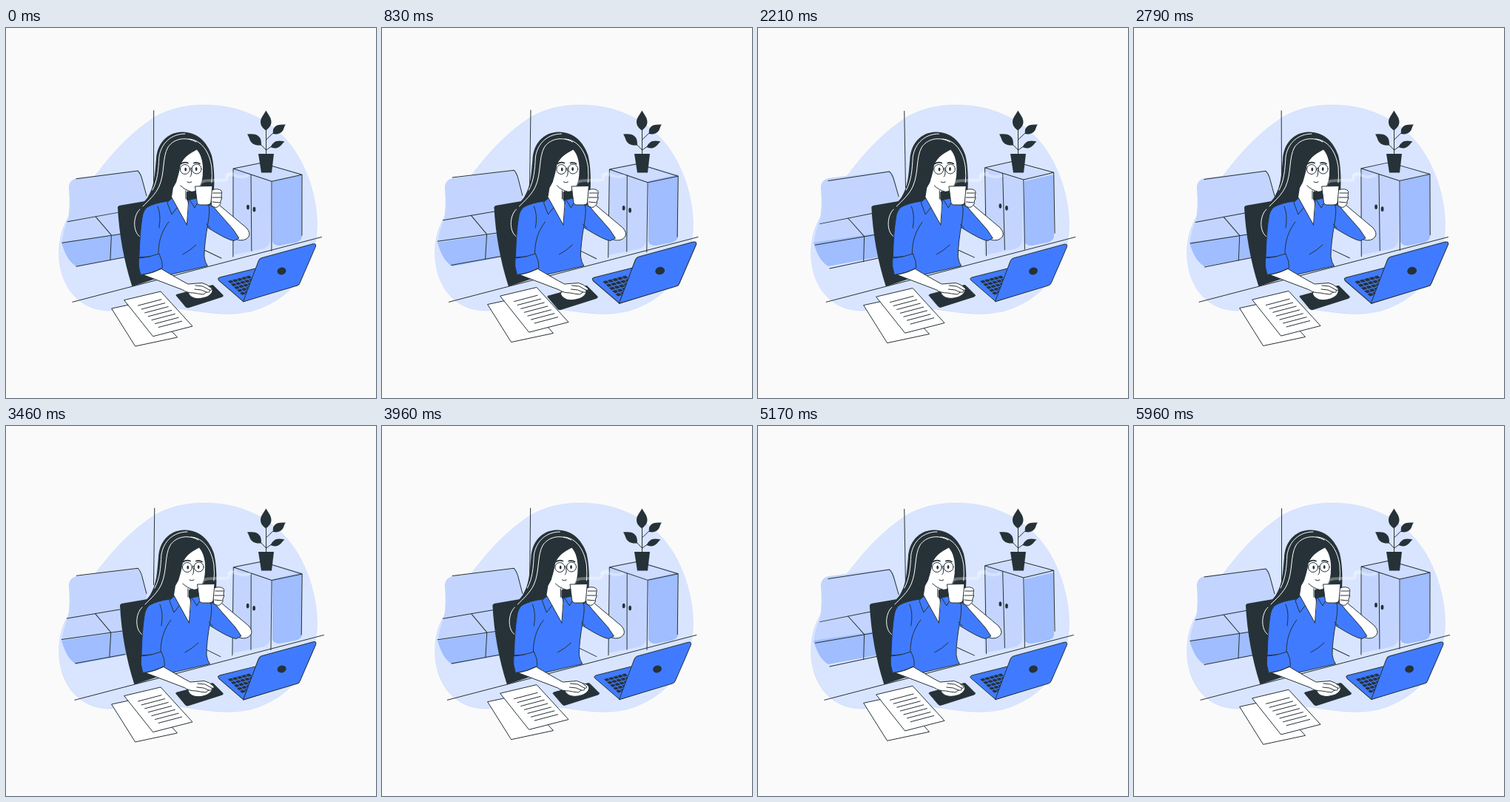
An HTML page that plays this animation: 500x500 px, repeating every 6 s.

```html
<!DOCTYPE html>
<html lang="en">
<head>
<meta charset="utf-8">
<title>Coffee at the desk</title>
<style>
html, body { margin: 0; width: 100%; height: 100%; overflow: hidden; background: #fafafa; }
svg { display: block; width: 100vw; height: 100vh; }
.line { fill: none; stroke: #263238; stroke-width: 1; stroke-linecap: round; stroke-linejoin: round; }
.dark { fill: #263238; }
.blue { fill: #407bff; }
.white { fill: #fff; }
.edge { stroke: #263238; stroke-width: 1; stroke-linecap: round; stroke-linejoin: round; }
.shine { fill: none; stroke: #fff; stroke-width: 1; stroke-linecap: round; }
</style>
</head>
<body>
<svg viewBox="0 0 500 500">
  <!-- backdrop -->
  <path fill="#d9e5ff" stroke="#407bff" stroke-opacity=".2" stroke-width=".5" d="M268 104C312 104 350 120 377 149C404 178 420 224 420.500 266C420 316 392 358 350 376C325 388 297 388 268 384C235 380 212 374 188 377C168 380 156 382 137 382C108 381 82 362 74 326C68 298 74 272 84 256C92 236 104 219 124 195C141 173 165 144 200 121C222 108 246 104 268 104Z"/>
  <path fill="#c3d5ff" d="M95 203L178 193Q183 196 185 205L190 229V275L143 280L75 291Q77 275 84 258Q87 240 85 218Q84 206 95 203Z"/>
  <path fill="#9fbdff" d="M75 290L143 280L165 277V309L95 322Q82 315 75 290Z"/>
  <path fill="#cddcff" d="M307 190L345 182L400 198L359 207Z"/>
  <path fill="#c3d5ff" d="M307 190L359 207L357 288Q356 297 345 299L306 307Z"/>
  <path fill="#9fbdff" d="M360 207L400 198V282Q399 288 391 290L370 294Q361 294 360 288Z"/>

  <g id="room">
    <g class="line">
      <path d="M199.500 111.500V215M95 204L178 193Q182 197 184 205L190 227M83 262L154 249M121 255L142.500 280L141 314M76 290.500L158 278M95 322.500L162 309.500M268 300L291 311"/>
      <path d="M307 190L345 182L400 198L359 207ZM307 190V309M331 198L332 301M359 207V301M400 198V280"/>
    </g>
    <ellipse class="dark" cx="327" cy="242" rx="1.900" ry="3.300"/>
    <ellipse class="dark" cx="335.500" cy="245" rx="1.900" ry="3.300"/>
  </g>

  <!-- plant -->
  <path class="line" d="M351.500 172V130M351.500 165L343 156M351.500 151L362 141M351.500 165L360 159"/>
  <g class="dark">
    <path d="M341 170H362L359 195.500H345Z"/>
    <path d="M351.300 111.500C355 118 358.500 121 358.500 127C358.500 133 354 136 351.300 138.500C348 136 344 133 344 127C344 121 348 118 351.300 111.500Z"/>
    <path d="M326 143.500C333 143 339 143 342 147C345 150 345 155 345 158.500C340 159 335 158 332 155C329 152 329 148 326 143.500Z"/>
    <path d="M378 130.500C370 130 365 131 363 134C360 137 361 140 361 143C366 144 370 143 373 140C376 137 375 134 378 130.500Z"/>
    <path d="M376.500 153.500C370 152 365 152 362 155C359 157 359 159 357.500 161C362 163 367 163 370 160C373 158 373 156 376.500 153.500Z"/>
  </g>

  <g id="desk"></g>

  <g id="sheets" class="white edge">
    <path d="M143 379.400L187 370L231.500 418.400L175 430.400Z"/>
    <path d="M160 368L209 356.400L252 403.400L199 417Z"/>
    <path id="text" class="line"/>
  </g>

  <g id="woman">
    <path class="line" d="M90 370.300L426.500 282.500"/>
    <path class="dark" d="M153 240L188 234L205 338L170.500 349.300Q154 298 151 242Z"/>
    <!-- hair -->
    <path class="dark" d="M238 140.500C258 140 272 154 278 172C282 188 283 215 279 239L240 240L205 243C192 243 187 258 185 283C175 280 171 268 172 257C173 244 184 240 192 228C201 213 201 198 203 178C204 157 217 141 238 140.500Z"/>
    <path class="shine" d="M183 283C171 278 171 254 181 245"/>
    <!-- raised arm -->
    <path class="white edge" d="M278 240L288 239L325 270Q331 277 328 282Q323 289 312 286L285 266Z"/>
    <path class="blue edge" d="M266 238Q280 238 285 247L307 272L315 284L308 287.500Q300 287 273 270Z"/>
    <!-- shirt -->
    <path class="blue edge" d="M191 242Q202 236 219 234L226 229L243 233L258 230L274 240Q276 246 273 264Q268 292 268 309Q269 317 272.500 321.500L212 335.500L205 308L180 310Q181 275 184 257Q185 247 191 242Z"/>
    <path class="white" d="M231 207L250 216L244 222V231L247 240L244.500 266L224 229L226 216Z"/>
    <path class="line" d="M244.500 266L224 229L218 236L224 252L231 243M244.500 266L247 230L255 243L259 236M243 219L243 231M220 262C211 274 206 287 206 306M271 265L276 270M257 293Q250 300 239 306M205 241Q210 252 207 270"/>
    <!-- face -->
    <path class="white" d="M258 164.500C264 171 267 183 266 195C266 210 260 221 250 221C241 220 235 216 230 211C231 203 234 198 235 189C237 177 247 170 258 164.500Z"/>
    <path class="line" d="M236 213Q242 219 250 221M250 191Q252 198 249 201M245 208Q248 210 251 208M235 189L232 187M248.500 190Q250 188 251.500 190"/>
    <path class="line" style="stroke-width:1.800" d="M236.500 183.500Q241 180.500 246 182.500M254 182.500Q258 181 262 183.500"/>
    <circle class="line" cx="242" cy="191" r="6.500"/>
    <circle class="line" cx="257.700" cy="190.500" r="6.500"/>
    <ellipse class="dark" cx="242.800" cy="191" rx="1.400" ry="2.600"/>
    <ellipse class="dark" cx="257.200" cy="190.500" rx="1.400" ry="2.600"/>
    <path class="shine" d="M257 154C245 147 228 148 219 161C211 175 215 196 207 214C202 225 193 233 185 241M242 143C224 143 210 155 207 174C206 192 205 206 198 219M247 150C264 151 275 167 278 188Q279 200 278 209"/>
    <!-- steam -->
    <path fill="none" stroke="#fff" stroke-opacity=".32" stroke-width="4" d="M262 214C261 207 268 206 279 206C290 205 299 208 299 202C298 197 304 197 312 200Q319 203 328 199"/>
    <path fill="none" stroke="#fff" stroke-opacity=".25" stroke-width="3" d="M297 201C298 196 302 195 309 196"/>
    <!-- cup and hand -->
    <path class="white edge" d="M276 221C280 217 286 217 290 219Q293 221 291 226Q293 230 290 234Q291 238 288 240Q284 245 278 240Z"/>
    <path class="line" d="M280 223L291 223M279 229L291 229M279 235L289 236"/>
    <path class="white edge" d="M256 214L279 213.500L277 236Q276 239 272 239H262Q259 239 258.500 236Z"/>
    <!-- mouse arm -->
    <path class="blue edge" d="M179.500 311Q194 310 207 305Q212 315 211.500 324Q197 332 182 333.500Q178 322 179.500 311Z"/>
    <path class="white edge" d="M186 333.500Q199 331 210 325.500Q231 338 246 346L265 344.500Q272 346 278 352Q279 355 275 354Q277 358 271 357L267 360Q258 359 254 358Q244 358 239 354Z"/>
    <path class="line" d="M256 348L266 349L275 354M255 353L264 354L271 357"/>
  </g>
</svg>
<script>
const $ = id => document.getElementById(id);
const shape = (cls, d) => `<path class="${cls}" d="${d}"/>`;

// keyboard on a slanted grid
let keys = "";
for (let r = 0; r < 5; r++) {
  for (let c = 0; c < 5; c++) {
    const x = 300 + c * 6 + r * 4, y = 342 - c * 1.55 + r * 3.9;
    keys += `M${x} ${y}l5-1.300l3 2.900l-5 1.300z`;
  }
}
$("desk").innerHTML =
  shape("dark edge", "M231 361Q231 360 234 359.500L277 348Q280 347 281 348.500L293.500 361Q294 362 292 363L248 377Q246 378 244 376.500Z") +
  shape("white edge", "M247 357C250 350 267 345 276 349C283 353 279 361 269 364C259 367 249 365 247 357Z") +
  shape("blue edge", "M287 338.500L289 337L337 325L395 346L321 369.500L288 341Z") +
  shape("dark", keys) +
  shape("blue edge", "M320.500 369.500L341 315Q342 312 345 311L414 292.200Q418.500 291.500 417.500 295.500L396.500 344Q395.500 347 393 347.800Z") +
  `<ellipse class="dark" cx="372" cy="328.500" rx="6" ry="4.800" transform="rotate(-15 372 328.500)"/>`;

let rows = "";
for (let i = 0; i < 7; i++)
  rows += `M${178.5 + i * 4.6} ${375.5 + i * 4.9}l31.500-8.300`;
$("text").setAttribute("d", rows);

// linear interpolation through [position, value] pairs
function track(stops, p) {
  const i = stops.findIndex(s => s[0] > p);
  const [a, u] = stops[i - 1], [b, v] = stops[i];
  return u + (v - u) * (p - a) / (b - a);
}
const shake = [0, -1, 2, -4, 4, -4, 4, -4, 2, -1, 0].map((v, i) => [i / 10, v]);
const beat = [[0, 1], [.1, 1.1], [.3, 1], [.4, 1], [.5, 1.1], [.6, 1], [1, 1]];
const wind = [[0, 0], [.25, 1], [.75, -1], [1, 0]];
const float = [[0, 0], [.5, -10], [1, 0]];

const move = (id, value) => $(id).setAttribute("transform", value);

function draw(now) {
  const t = (now + 60) % 6000;
  const slow = t / 6000, fast = t % 3000 / 3000;
  move("woman", `translate(${track(shake, slow)} 0)`);
  move("desk", `translate(324 334) scale(${track(beat, slow)}) translate(-324 -334)`);
  move("room", `rotate(${track(wind, fast)} 238 216)`);
  move("sheets", `translate(0 ${track(float, fast)})`);
}

const start = performance.now();
function tick() {
  draw(performance.now() - start);
  requestAnimationFrame(tick);
}
tick();
</script>
</body>
</html>
```
